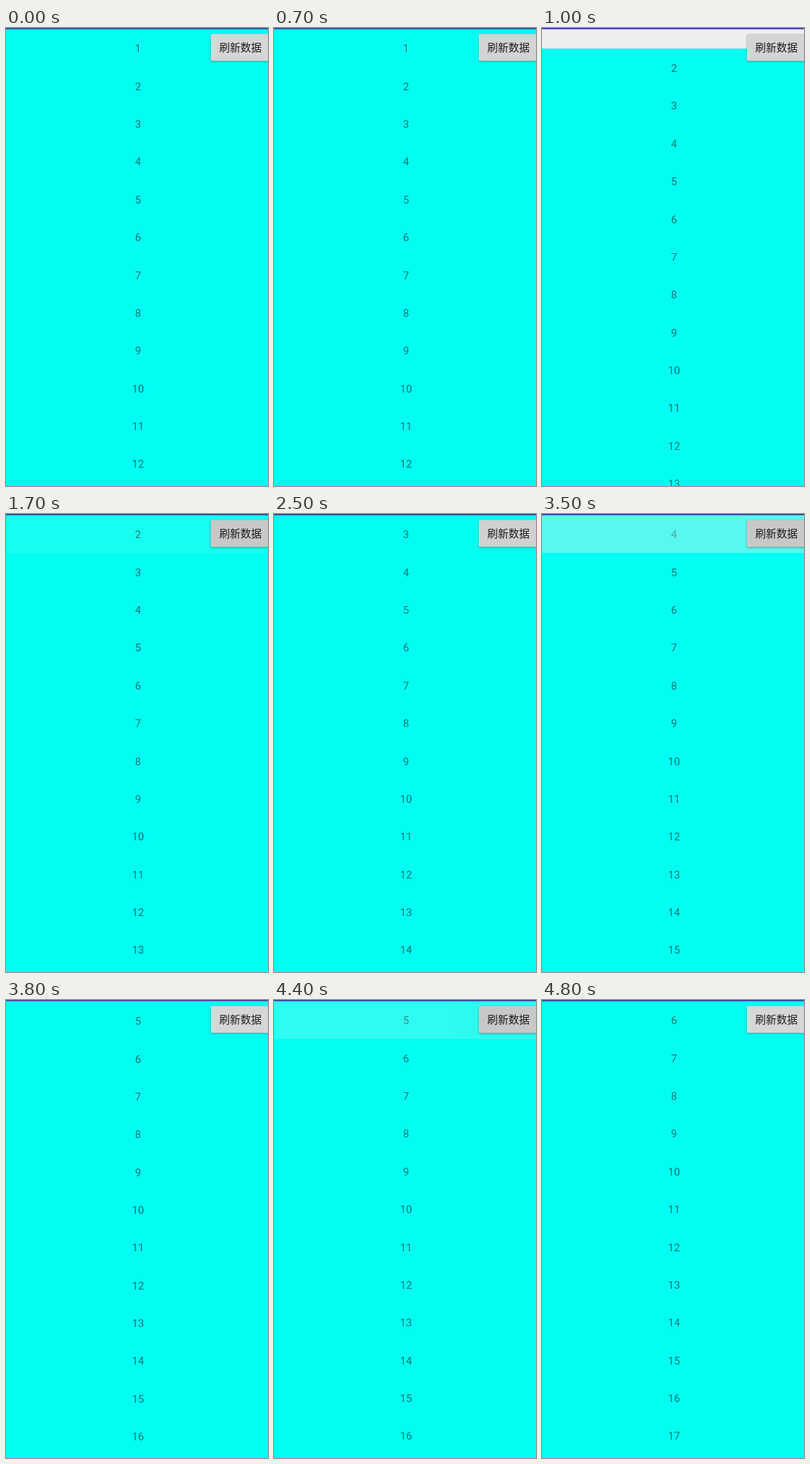
Animation, 371 px wide and 647 px high, one loop 5.6 s. Source, as an HTML page:

```html
<!DOCTYPE html>
<html lang="zh-CN">
<head>
<meta charset="utf-8">
<style>
  html, body { margin: 0; width: 100%; height: 100%; overflow: hidden; background: #eee; }
  svg { display: block; width: 371px; height: 647px; }
  text { text-anchor: middle; }
  .row { font: 15px Roboto, sans-serif; fill: rgba(0, 0, 0, .54); }
  .label { font: 500 15px "Noto Sans CJK SC", "Noto Sans CJK", sans-serif; fill: rgba(0, 0, 0, .87); }
  .cell { fill: #00fff2; shape-rendering: crispEdges; }
</style>
</head>
<body>
<svg viewBox="0 0 371 647">
  <rect width="371" height="647" fill="#eee"/>
  <g id="head"><rect class="cell" y="1" width="371" height="54"/></g>
  <g id="body"><rect class="cell" y="55" width="371" height="720"/></g>
  <rect width="371" height="1.7" fill="#303f9f"/>
  <rect id="button" x="290" y="8.5" width="84" height="38" rx="2"/>
  <text class="label" x="332" y="33.3">刷新数据</text>
</svg>
<script>
const LOOP = 5600, STEP = 100, ROW = 53.36, FADE = 120, MOVE = 250;
// Finger down and release times; each release removes the top row
const taps = [[690, 758], [1490, 1675], [2470, 2520], [3390, 3450], [4290, 4365]];

const [head, body, button] = ['head', 'body', 'button'].map(id => document.getElementById(id));
const clamp = x => Math.max(0, Math.min(1, x));
const ease = x => (1 - Math.cos(Math.PI * clamp(x))) / 2;

const labels = Array.from({ length: 14 }, (_, i) => {
  const text = document.createElementNS('http://www.w3.org/2000/svg', 'text');
  text.setAttribute('class', 'row');
  text.setAttribute('x', 187);
  text.setAttribute('y', 34.4 + i * ROW);
  return (i ? body : head).appendChild(text);
});

function draw(t) {
  let first = 1, alpha = 1, shift = 0, press = 0;
  for (const [down, up] of taps) {
    const age = t - up;
    if (t >= down) press = Math.min(clamp((t - down) / 90), clamp(1 - (age - 60) / 220));
    if (age >= FADE + MOVE) first++;
    else if (age > 0) {
      alpha = 1 - ease(age / FADE);
      shift = -ROW * ease((age - FADE) / MOVE);
    }
  }
  labels.forEach((label, i) => label.textContent = first + i);
  head.setAttribute('opacity', alpha);
  body.setAttribute('transform', `translate(0 ${shift})`);
  const shade = 214 - 14 * press;
  button.style.fill = `rgb(${shade}, ${shade}, ${shade})`;
  button.style.filter = `drop-shadow(0 ${1 + press * .6}px ${1 + press * .8}px rgba(0, 0, 0, .35))`;
}

const start = performance.now();
function tick() {
  const t = (performance.now() - start) % LOOP;
  draw(Math.floor(t / STEP) * STEP);
  requestAnimationFrame(tick);
}
tick();
</script>
</body>
</html>
```
